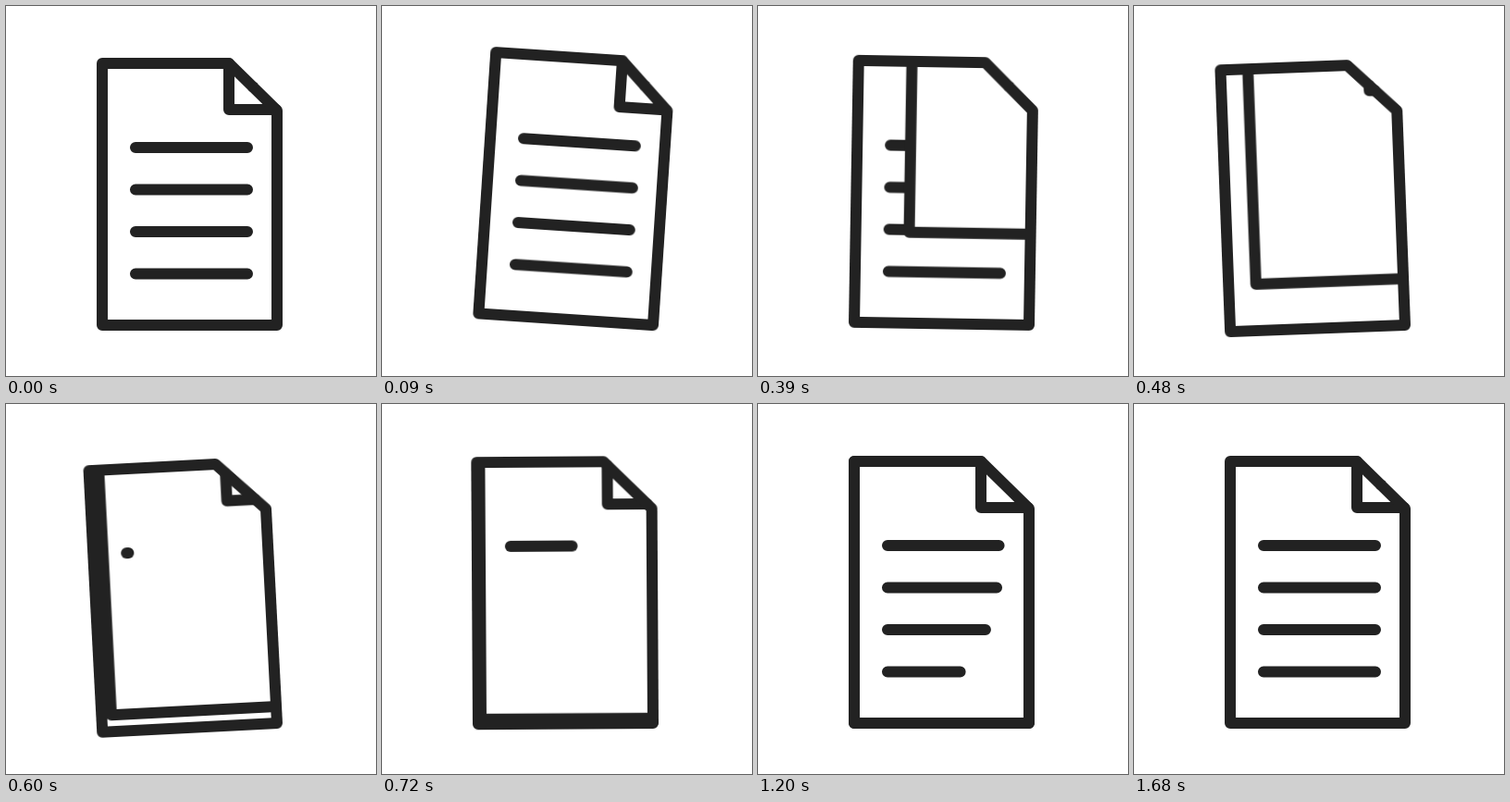
An HTML page that plays this animation: 400x400 px, repeating every 8000 ms.

```html
<!DOCTYPE html>
<html lang="en">
<head>
<meta charset="utf-8">
<title>Page turn</title>
<style>
  html, body { margin: 0; width: 100%; height: 100%; overflow: hidden; background: #fff; }
  svg { display: block; width: 100vw; height: 100vh; }
  path { fill: none; stroke: #222; stroke-width: 12; stroke-linecap: round; stroke-linejoin: round; }
  .cover { fill: #fff; stroke: none; }
  #sheet { transform-origin: 293px 345px; }
</style>
</head>
<body>
<svg viewBox="0 0 400 400">
  <g id="sheet">
    <path d="M140 153H261M140 198.5H261M140 244H261M140 289.5H261"/>
    <path id="cover" class="cover"/>
    <path id="oldFlap"/>
    <path id="text"/>
    <path id="newFlap"/>
    <path d="M104 62H241L293 113V345H104Z"/>
  </g>
</svg>
<script>
const LOOP = 8000, STEP = 30, END = 1680;
const LEFT = 104, TOP = 62, RIGHT = 293, BOTTOM = 345;
const FOLD = [241, 112], CREASE = [267, 87.5], CORNER = [LEFT, BOTTOM];
const LINE_X = 140, LINE_LENGTH = 121, LINE_Y = 153, LINE_GAP = 45.5;
const LINE_STARTS = [597, 746, 911, 1042];
const EASE_MS = 985;

const get = id => document.getElementById(id);
const [sheet, cover, oldFlap, newFlap, text] =
  ['sheet', 'cover', 'oldFlap', 'newFlap', 'text'].map(get);

// Fast start, long soft settle
const settle = (t, start) => {
  const u = Math.min(1, Math.max(0, (t - start) / EASE_MS));
  return 1 - (1 - u) ** 6;
};
const mix = (a, b, p) => a.map((v, i) => v + (b[i] - v) * p);

// [ms, degrees, easing towards the next step]
const SWING = [
  [0, 0, 'ease'],
  [285, 7, 'ease'],
  [585, -3, 'ease-in-out'],
  [845, 2, 'ease-in-out'],
  [1150, 0, 'linear']
];
const swingMs = SWING[SWING.length - 1][0];
const swing = sheet.animate(
  SWING.map(([ms, deg, easing]) => ({ offset: ms / swingMs, transform: `rotate(${deg}deg)`, easing })),
  { duration: swingMs, fill: 'both' }
);
swing.pause();

// Flap edges run from the cut corner of the sheet to the flap tip
function flapPath([x, y]) {
  const top = TOP + Math.max(0, x - 241) * 51 / 52;
  const right = Math.min(RIGHT, 241 + (y - TOP) * 52 / 51);
  return `M${x} ${top}V${y}H${right}`;
}

function draw(t) {
  swing.currentTime = Math.min(t, swingMs);

  const tip = mix(FOLD, CORNER, settle(t, 258));
  oldFlap.setAttribute('d', flapPath(tip));
  cover.setAttribute('d', `M${tip[0]} ${TOP}H241L${RIGHT} 113V${tip[1]}H${tip[0]}Z`);
  newFlap.setAttribute('d', flapPath(mix(CREASE, FOLD, settle(t, 460))));

  text.setAttribute('d', LINE_STARTS.map((start, i) => t > start
    ? `M${LINE_X} ${LINE_Y + i * LINE_GAP}h${LINE_LENGTH * settle(t, start)}`
    : '').join(''));
}

const begin = performance.now();
function tick() {
  const ms = (performance.now() - begin) % LOOP;
  const t = Math.floor(ms / STEP) * STEP;
  draw(t < END ? t : 0);
  requestAnimationFrame(tick);
}
tick();
</script>
</body>
</html>
```
